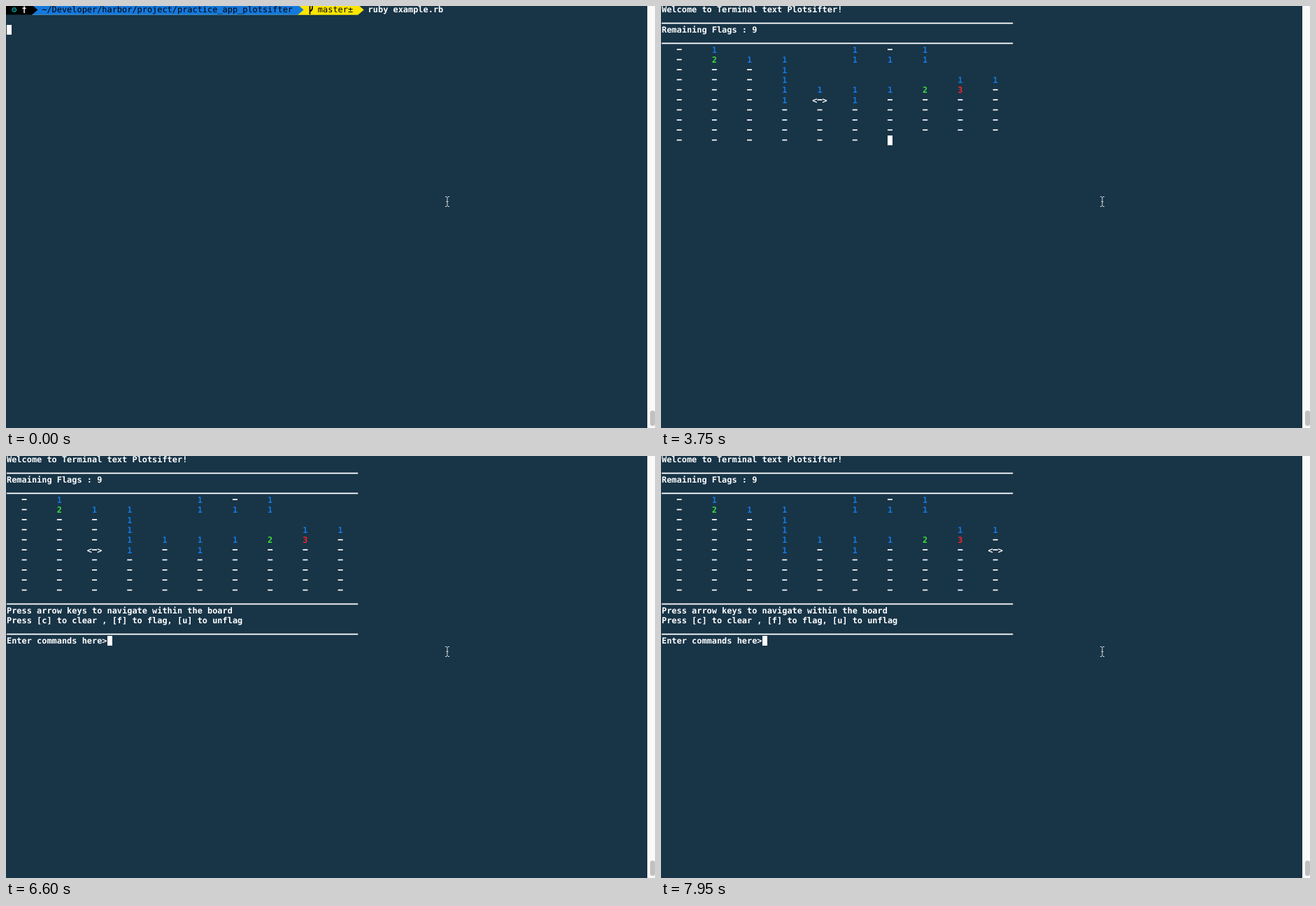
Write an HTML page with a canvas that moves like this. It is 928 px wide and 603 px high and loops after 8000 ms.

```html
<!DOCTYPE html>
<html lang="en">
<head>
<meta charset="utf-8">
<title>Terminal field game</title>
<style>
html, body { margin: 0; width: 100%; height: 100%; overflow: hidden; background: #183447; }
canvas { display: block; }
</style>
</head>
<body>
<canvas id="stage" width="928" height="603"></canvas>
<script>
const ctx = document.getElementById('stage').getContext('2d');
const LOOP = 8000, CHAR = 7.175, LINE = 14.375, BOARD_LINE = 4;
const BACK = '#183447', BLUE = '#1578dc', YELLOW = '#ffe600', WHITE = '#fff';
const DIGITS = { 1: BLUE, 2: '#3bde3a', 3: '#f4242a' };
const CLOSED = Array(10).fill('----------');
const OPENED = [
  '-1   1-1  ', '-211 111  ', '---1      ', '---1    11', '---111123-', '---1-1----',
  ...CLOSED.slice(6)
];

// start time, board, cursor row, cursor column, cells printed so far
const STEPS = [
  [150, CLOSED, 4, 4, 100],
  [2850, OPENED, 4, 4, 100],
  [3750, OPENED, 5, 4, 96],
  [3900, OPENED, 5, 4, 100],
  [4800, OPENED, 5, 3, 100],
  [5100, OPENED, 5, 2, 100],
  [5400, OPENED, 5, 1, 100],
  [6600, OPENED, 5, 2, 100],
  [7050, OPENED, 5, 3, 100],
  [7200, OPENED, 5, 5, 100],
  [7350, OPENED, 5, 6, 10],
  [7500, OPENED, 5, 7, 100],
  [7800, OPENED, 5, 8, 100],
  [7950, OPENED, 5, 9, 100]
];

const colX = col => 1 + col * CHAR;
const lineY = line => -1.75 + line * LINE;

function rect(x, y, w, h, color) {
  ctx.fillStyle = color;
  ctx.fillRect(x, y, w, h);
}

// Text on the terminal's character grid
function write(text, col, line, color = WHITE, weight = 'bold') {
  ctx.font = weight + ' 11.92px "DejaVu Sans Mono", monospace';
  ctx.fillStyle = color;
  [...text].forEach((ch, i) => {
    if (ch !== ' ') ctx.fillText(ch, colX(col + i), lineY(line) + 11);
  });
}

const block = (col, line) => rect(Math.round(colX(col)), Math.round(lineY(line)), 7, 14, WHITE);
const rule = line => rect(1, lineY(line) + 11.1, 70 * CHAR, 1.8, WHITE);

function segment(end, color) {
  ctx.fillStyle = color;
  ctx.beginPath();
  ctx.moveTo(0, lineY(0));
  ctx.lineTo(end, lineY(0));
  ctx.lineTo(end + 8.5, 5.4);
  ctx.lineTo(end, lineY(1));
  ctx.lineTo(0, lineY(1));
  ctx.fill();
}

function stroke(path, color, width) {
  ctx.strokeStyle = color;
  ctx.lineWidth = width;
  ctx.stroke(new Path2D(path));
}

function drawPrompt() {
  segment(colX(70), YELLOW);
  segment(colX(58), BLUE);
  segment(colX(5), '#000');
  ctx.font = '10px "DejaVu Sans", sans-serif';
  ctx.fillStyle = '#00cfd0';
  ctx.fillText('⚙', 7.3, 8.8);
  write('†', 3, 0);
  write('~/Developer/harbor/project/practice_app_plotsifter', 7, 0, '#000', 'normal');
  stroke('M434.5 0V12M438 0V3Q438 6 434.5 8', '#000', 1.7);
  write('master±', 62, 0, '#000', 'normal');
  write('ruby example.rb', 72, 0);
  block(0, 2);
}

function drawGame([, board, row, col, shown]) {
  write('Welcome to Terminal text Plotsifter!', 0, 0);
  rule(1);
  write('Remaining Flags : 9', 0, 2);
  rule(3);
  for (let i = 0; i < shown; i++) {
    const r = Math.floor(i / 10), c = i % 10;
    const line = BOARD_LINE + r, at = c * 7 + 3, cell = board[r][c];
    if (cell === '-') rect(colX(at) + 0.1, lineY(line) + 5.6, 7, 1.7, WHITE);
    else write(cell, at, line, DIGITS[cell]);
    if (r === row && c === col) {
      write('<', at - 1, line);
      write('>', at + 1, line);
    }
  }
  if (shown < 100) {
    block(shown % 10 * 7 + 3, BOARD_LINE + Math.floor(shown / 10));
    return;
  }
  rule(14);
  write('Press arrow keys to navigate within the board', 0, 15);
  write('Press [c] to clear , [f] to flag, [u] to unflag', 0, 16);
  rule(17);
  write('Enter commands here>', 0, 18);
  block(20, 18);
}

function drawWindow() {
  rect(917, 0, 11, 603, '#fafafa');
  ctx.fillStyle = '#c1c1c1';
  ctx.beginPath();
  ctx.roundRect(921, 578, 7, 22, 3.5);
  ctx.fill();
  stroke('M628 272.5H630L631 273.5L632 272.5H634M631 273V286M628 286.5H630L631 285.5L632 286.5H634M629.5 279.5H632.5', '#d5dadd', 1);
}

function draw(now) {
  const t = now % LOOP;
  const step = STEPS.findLast(s => s[0] <= t);
  rect(0, 0, 928, 603, BACK);
  if (step) drawGame(step);
  else drawPrompt();
  drawWindow();
  requestAnimationFrame(draw);
}

ctx.textRendering = 'geometricPrecision';
requestAnimationFrame(draw);
</script>
</body>
</html>
```
